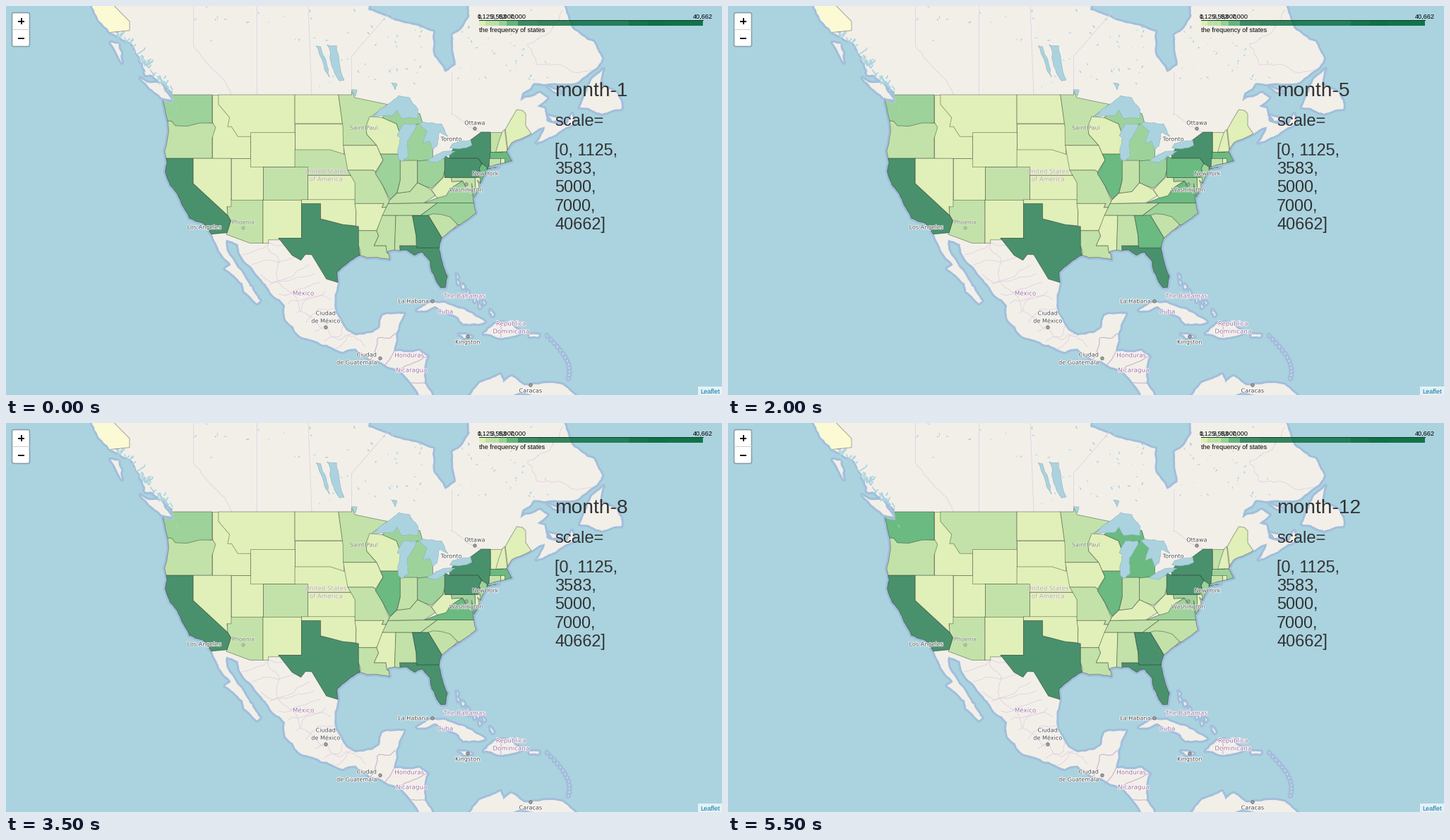
These frames come from a looping animation (1014 by 552 pixels, 6000 ms). A matplotlib script:

```python
import numpy as np
import matplotlib.pyplot as plt
from matplotlib.animation import FuncAnimation
from matplotlib.colors import to_rgb
from matplotlib.patches import Circle, Ellipse, FancyBboxPatch, Polygon, Rectangle
from matplotlib.patheffects import withStroke

W, H, DPI = 1014, 552, 100
PX = 72 / DPI
SEA, LAND, COAST, LILAC = "#aad3df", "#f2efe9", "#a2bedc", "#dfcfdf"
YLGN = ["#ffffcc", "#d9f0a3", "#addd8e", "#78c679", "#31a354", "#006837"]
FILLS = [0.7 * np.array(to_rgb(c)) + 0.3 * np.array(to_rgb(LAND)) for c in YLGN]
BORDER = (0, 0, 0, 0.36)
MONTHS, LOW_MONTH = 12, 6
DEGREE = 9.02

rng = np.random.default_rng(7)
fig = plt.figure(figsize=(W / DPI, H / DPI), dpi=DPI, facecolor=SEA)
ax = fig.add_axes([0, 0, 1, 1])
ax.set_xlim(0, W)
ax.set_ylim(H, 0)
ax.axis("off")


def project(*flat):
    """Web Mercator pixels from alternating degrees west and degrees north."""
    west, north = np.reshape(flat, (-1, 2)).T
    y = np.degrees(np.log(np.tan(np.pi / 4 + np.radians(north) / 2)))
    return np.column_stack([1347.6 - DEGREE * west, 634.4 - DEGREE * y])


def rough(*flat, amount=0.05, levels=3):
    """Join a few places by a ragged line, using midpoint displacement."""
    p = project(*flat)
    for _ in range(levels):
        step = np.diff(p, axis=0)
        normal = np.column_stack([-step[:, 1], step[:, 0]])
        out = np.empty((2 * len(p) - 1, 2))
        out[::2] = p
        out[1::2] = p[:-1] + step / 2 + normal * rng.normal(0, amount, (len(step), 1))
        p = out
    return p


def land(points):
    ax.add_patch(Polygon(points, fc=COAST, ec=COAST, lw=6 * PX, joinstyle="round", zorder=1))
    return ax.add_patch(Polygon(points, fc=LAND, lw=0, zorder=2))


def island(*flat):
    return land(rough(*flat, *flat[:2]))


def lake(*flat):
    ax.add_patch(Polygon(rough(*flat, *flat[:2]), fc=SEA, ec="#8db4bd", lw=0.6 * PX, zorder=6))


def line(*flat, color=LILAC, width=0.8, amount=0.05, clip=None):
    drawn, = ax.plot(*rough(*flat, amount=amount).T, color=color, lw=width * PX, zorder=3.5)
    if clip:
        drawn.set_clip_path(clip)


def text(x, y, s, size, color="black", ha="center", **kw):
    return ax.text(x, y, s, fontsize=size * PX, color=color, ha=ha,
                   **{"family": "Liberation Sans", "va": "baseline", "zorder": 9, **kw})


def place(x, y, s, dot=None, country=False, alpha=1):
    color, size = ("#9d6a9d", 8.7) if country else ("#454545", 8.1)
    halo = [withStroke(linewidth=1.2, foreground=(1, 1, 1, 0.45 * alpha))]
    for i, row in enumerate(s.split("\n")):
        text(x, y + 11 * i, row, size, color, va="center", zorder=7, alpha=alpha,
             family="DejaVu Sans", path_effects=halo)
    if dot:
        ax.add_patch(Circle(dot, 2.2, fc="#a5a29f", ec="#686563", lw=0.8 * PX, zorder=7, alpha=alpha))


# Coast of the mainland, followed anticlockwise from the northwest
northwest = rough(136.5, 58, 135, 56.3, 133, 55, 130.3, 54.2, 128.4, 52.4, 127.5, 51, 125, 50.2,
                  123.2, 49.3, 122.4, 47.3, 122.8, 48.1, 124.7, 48.4, amount=0.1)
pacific = rough(124.7, 48.4, 124.0, 46.2, 124.1, 44, 124.5, 42.8, 124.1, 41.5, 124.4, 40.4,
                123.7, 38.9, 122.5, 37.7, 121.9, 36.6, 120.6, 34.6, 118.5, 34, 117.1, 32.5, amount=0.03)
mexico = rough(117.1, 32.5, 116, 30.4, 114.1, 28.4, 115, 27.8, 112.3, 25.8, 112, 24.6, 110, 22.9,
               109.5, 23.3, 111.3, 25.8, 114.7, 30.3, 114.8, 31.8, 113, 31.2, 112.2, 29.2,
               109.5, 26.5, 108, 24.7, 105.6, 22.6, 105.5, 20.5, 103.5, 18.3, 100, 16.9,
               96.5, 15.7, 94.5, 16.2, 92.2, 14.5, 87.5, 12.9, 85.8, 11, 84.5, 9)
caribbean = rough(82.5, 9, 83.7, 11, 83.2, 15, 84.5, 15.9, 88.5, 15.8, 88.2, 18.4, 86.9, 21.4,
                  90.3, 21.1, 90.7, 19.4, 91.9, 18.6, 94.5, 18.2, 96, 19, 97.6, 21.5, 97.8, 24, 97.3, 25.9)
gulf = rough(97.3, 25.9, 97.4, 27.4, 95, 29.1, 93.8, 29.7, 91.5, 29.4, 89.2, 29.1, 89.5, 30.2,
             86.5, 30.4, 85.3, 29.7, 84, 30.1, 82.8, 28.8, 82.6, 27.5, 81.8, 26, 81.1, 25.2, amount=0.04)
atlantic = rough(81.1, 25.2, 80.4, 25.2, 80.1, 26.8, 81.4, 30.5, 81, 32, 79.2, 33.2, 77.9, 33.9,
                 76.5, 34.7, 75.6, 35.3, 76, 36.8, 76.3, 39, 75.9, 37.3, 75.1, 38.5, 75.4, 39.4,
                 74.9, 39, 74, 40.4, 73.7, 41, 71, 41.5, 70, 41.7, 70.8, 42.8, 70, 43.8, 67, 44.8,
                 amount=0.03)
northeast = rough(67, 44.8, 64.8, 45.6, 66.1, 43.8, 63.5, 44.6, 60.2, 45.9, 60.5, 47, 61.4, 45.8,
                  64.5, 46.2, 64.9, 47.6, 66, 47.8, 64.4, 48.7, 65.5, 49.2, 68.5, 48.4, 71.2, 46.8,
                  68.3, 49.2, 66.5, 50.2, 60, 50.2, 57.2, 51.5, 55.8, 52.6, 57.2, 54.2, 60.5, 55.4, 62, 57.6)
hudson = rough(77, 58, 76.6, 56.5, 79.3, 54.8, 78.8, 52, 80.5, 51.3, 82.3, 53, 82.3, 55.1,
               87.6, 56, 92.5, 57, 92.5, 58)
mainland = land(np.vstack([northwest, pacific, mexico, caribbean, gulf, atlantic, northeast, hudson]))
for shore in (pacific, gulf, atlantic):
    ax.plot(*shore.T, color=BORDER, lw=0.9 * PX, zorder=5.5)

island(128.3, 50.7, 125.2, 50.2, 123.4, 48.5, 125, 48.7, 127, 49.8)
island(133, 54.1, 131.7, 54, 131.2, 52.2)
island(55.6, 51.6, 56.2, 50, 53.5, 49.2, 52.8, 47.5, 55.8, 47, 59.3, 47.7, 57.5, 50.5)
island(64.4, 49.9, 62, 49.2, 63.5, 49.4)
island(64.2, 46.8, 62.2, 46.4, 63.6, 46.2)
island(84.9, 21.9, 82.8, 23, 80.5, 23, 77, 21.7, 74.2, 20.2, 77.6, 19.9, 78.3, 20.8, 82, 22.5)
island(74.4, 18.4, 72.7, 19.9, 70, 19.8, 68.4, 18.6, 71.5, 17.8)
island(78.3, 18.4, 76.2, 18, 77.5, 17.8)
island(67.2, 18.4, 65.7, 18.3, 65.8, 18, 67.2, 18)
island(77.5, 8, 75, 11, 71.8, 12.3, 71.3, 11, 70, 12, 68, 10.6, 62, 10.7, 60, 9, 60, 7)
long_island = island(74, 40.6, 72, 41, 73.6, 40.9)
for t in np.linspace(0, 1, 13):
    west, north = 64.5 - 3.5 * np.sin(1.9 * t), 18.3 - 6.5 * t
    island(west, north, west - 0.2, north - 0.2, west, north - 0.3)
    west, north = 78.6 - 5.6 * t + rng.normal(0, 0.4), 26.7 - 5.3 * t + rng.normal(0, 0.3)
    island(west, north, west - 0.3, north - 0.4, west - 0.1, north - 0.6)

# Waters
lake(92, 46.7, 89, 48.2, 87.8, 48.9, 86, 48.7, 84.7, 47.5, 84.7, 46.5, 87.3, 46.5, 88, 47.4,
     88.5, 46.9, 90.5, 46.8)
lake(87.8, 42, 87.2, 41.6, 86.3, 42.2, 86.4, 44, 85.5, 45, 85, 45.9, 87, 45.9, 88, 44.6, 87.5, 44.4, 87.9, 43)
lake(84.7, 45.9, 83.3, 45.1, 83.9, 43.7, 82.9, 44, 82.4, 43, 81.7, 43.5, 81.4, 45, 80, 44.5, 81, 45.9, 84, 46.1)
lake(83.4, 41.7, 81.7, 41.5, 78.9, 42.8, 81, 42.7, 82.5, 42.1)
lake(79.7, 43.2, 76.3, 43.5, 76.5, 44.1, 79.3, 43.7)
lake(99, 53.9, 97.5, 53.8, 96.3, 50.5, 97, 50.4, 98.3, 52)
lake(100.7, 53.8, 100, 53.7, 98.6, 50.8, 99.4, 51.6)
lake(88.9, 50.2, 88, 50.1, 88.3, 49.5)
lake(95.2, 49.5, 94.3, 49.5, 94.5, 48.9)
for west, east, south, north, count in [(102, 84, 49.5, 57.3, 45), (79, 63, 50.5, 57, 45), (120, 102, 54, 57.3, 12)]:
    for _ in range(count):
        spot = project(rng.uniform(east, west), rng.uniform(south, north))[0]
        ax.add_patch(Ellipse(spot, rng.uniform(1, 5), rng.uniform(0.6, 2),
                             angle=rng.uniform(0, 180), fc=SEA, zorder=3))
for t in rng.uniform(0, 1, 50):
    west, north = 135 - 11.5 * t + rng.normal(0, 0.3), 57 - 7.3 * t
    reach = rng.uniform(0.4, 1.3)
    line(west, north, west - reach * rng.uniform(0.2, 1), north - reach * rng.choice([-0.4, 0.8]),
         color=SEA, width=1.6, amount=0.12)

# Base map borders
for west, north, south, east in [(120, 58, 53.8, 120), (110, 58, 49, 110), (102, 58, 49, 101.4),
                                 (95.15, 52.8, 49, 95.15), (79.5, 51.3, 47, 79.5)]:
    line(west, north, east, south, amount=0)
line(120, 53.8, 118, 52.3, 114, 49)
line(95.15, 52.8, 89, 56.9, amount=0)
line(79.5, 47, 77, 45.7, 74.8, 45)
line(62, 57, 64, 55, 67.5, 54, 66, 52, 63.5, 52, 57.2, 51.5, amount=0.12)
for t in np.linspace(0.05, 1, 11):
    line(113 - 15 * t, 30.5 - 14.5 * t, 104 - 9 * t, 31.5 - 13 * t, amount=0.12, clip=mainland)
line(108.2, 31.3, 107, 27, 104, 24, 101, 20.5, 97, 17.5, 93, 16.5, amount=0.12)
for route in [(92.2, 14.5, 91.4, 16.1, 91, 17.8, 89.1, 17.8, 88.3, 18.5), (90, 13.6, 89.2, 14.5, 88.5, 15.8),
              (87.5, 12.9, 86, 13.8, 83.2, 15), (85.7, 11, 83.7, 10.9), (71.8, 19.8, 71.7, 18)]:
    line(*route, color="#c9a9cb", width=1)

states = []


def state(level, *outline, low=None, up=(), down=(), clip=mainland):
    """Add a state over its neighbours, cut off at the coast.

    Four numbers give a box: west, north, east, south. The colour class is
    raised or lowered in some months; low is the drop in the low month.
    """
    if len(outline) == 4:
        w, n, e, s = outline
        outline = w, n, e, n, e, s, w, s
    patch = Polygon(project(*outline), ec=BORDER, lw=0.9 * PX, joinstyle="round", zorder=5)
    ax.add_patch(patch)
    patch.set_clip_path(clip)
    if low is None:
        low = int(level > 1)
    states.append((patch, [level + up.count(m) - down.count(m) - low * (m == LOW_MONTH)
                           for m in range(1, MONTHS + 1)]))


# West; each state needs only the borders that later neighbours leave open
state(0, 140, 60, 135.5, 59, 130, 56, 130, 55.2, 137, 54.8)
state(1, 117.03, 49, 111.05, 42)
state(2, 125, 46.3, 116.9, 46, 116.5, 45.5, 117.03, 44.3, 117.03, 42, 125, 42)
state(3, 125, 49, 117.03, 49, 117.03, 46, 119, 46, 121, 45.65, 122.8, 45.7, 123.4, 46.2, 125, 46.3, up=(12,))
state(1, 116.05, 49, 104.05, 49, 104.05, 44.5, 113, 44.5, 114, 45.6, 114.6, 45.6, 114.3, 46.6,
      116.05, 48, low=1, up=(12,))
state(2, 114.6, 37, 109.05, 37, 109.05, 31.33, 111.07, 31.33, 114.8, 32.5, 114.1, 34.3, 114.7, 35.1)
state(5, 125, 42, 120, 42, 120, 39, 114.6, 35, 114.1, 34.3, 114.7, 32.72, 117.1, 32.53, 122, 33, low=0)
state(1, 120, 42, 114.05, 42, 114.05, 36.1, 114.7, 36.1, 114.6, 35, 120, 39, low=1)
state(1, 114.05, 42, 109.05, 37, low=1, up=(3,))
state(1, 111.05, 45, 104.05, 41, low=1)
state(1, 109.05, 37, 103, 37, 103, 32, 106.6, 32, 106.5, 31.78, 108.2, 31.78, 108.2, 31.33, 109.05, 31.33)
# Plains
state(1, 104.05, 49, 97.2, 49, 96.56, 45.94, 104.05, 45.94, low=1)
state(1, 104.05, 45.94, 96.45, 42.5, low=1)
state(1, 104.05, 43, 98.5, 43, 96.4, 42.5, 95.2, 42.5, 95.2, 40, 104.05, 40, up=(1,))
state(2, 109.05, 41, 102.05, 37)
state(1, 102.05, 40, 94.62, 37, low=1)
state(5, 103, 36.5, 100, 36.5, 100, 34.5, 94.04, 33.5, 94.04, 31, 93.7, 29, 96, 27, 97.1, 25.85,
      99.1, 26.4, 101.4, 29.77, 102.4, 29.8, 103.1, 29, 104.5, 29.7, 106.6, 32, 103, 32)
state(1, 103, 37, 94.62, 37, 94.43, 35.4, 94.48, 33.64, 96.5, 33.8, 100, 34.56, 100, 36.5, 103, 36.5)
state(2, 97.2, 49, 95.15, 49, 95.1, 49.4, 94.6, 48.7, 91, 48.2, 89.5, 48, 92, 46.7, 92.9, 45.6,
      92.75, 44.75, 91.2, 43.5, 96.45, 43.5, 96.5, 45.5)
state(1, 96.45, 43.5, 91.2, 43.5, 90.2, 41.8, 91.4, 40.4, 91.75, 40.6, 95.75, 40.6)
state(2, 95.75, 40.6, 91.75, 40.6, 91.4, 40.4, 90.2, 38.7, 89.2, 36.8, 89.7, 36, 90.4, 36,
      90.1, 36.5, 94.62, 36.5, 94.62, 39.1)
state(1, 94.62, 36.5, 90.1, 36.5, 90.4, 36, 89.7, 36, 91.2, 33, 94.04, 33, 94.04, 33.55, 94.48, 33.64, 94.43, 35.4)
# South
state(2, 94.04, 33, 91.2, 33, 90.9, 32.3, 91.6, 31, 89.75, 31, 89.6, 30.2, 88, 28.8, 94, 29, 93.7, 30.1, 94.04, 31,
      low=2)
state(1, 90.3, 35, 88.2, 35, 88.4, 30, 89.6, 30, 89.75, 31, 91.6, 31, 90.9, 32.3, 91.2, 33, low=1, up=(1,))
state(5, 87.6, 31, 79.5, 24.5)
state(2, 88.2, 35, 85.6, 35, 85, 32.3, 85, 31, 87.6, 31, 87.5, 30, 88.4, 30, down=(10,))
state(3, 84.3, 35, 81.7, 36.58, 75, 36.58, 75, 34, 79, 33.7, low=2, down=(3, 8, 12))
state(2, 83.1, 35, 82.3, 35.2, 81, 35.1, 79.7, 34.8, 78.5, 33.8, 80.8, 31.8, 82, 33.5)
state(5, 85.6, 35, 83.1, 35, 82, 33.5, 80.8, 31.8, 81.2, 30.7, 84.9, 30.7, 85, 32.3, low=2, down=(5,))
state(2, 90.3, 35, 84.3, 35, 81.7, 36.58, 89.4, 36.5)
state(2, 89.4, 36.5, 83.7, 36.6, 82, 37.5, 82.6, 38.2, 83.7, 38.7, 84.8, 39.1, 86, 38, 88, 37.8, 89.1, 37,
      down=(5, 12))
state(4, 83.7, 36.58, 75.8, 36.58, 75.5, 38, 77, 38.3, 77.7, 39.3, 79.6, 38.5, 81.7, 37.2,
      low=2, down=(1, 2, 10, 10, 12))
state(3, 79.5, 39.72, 75.78, 39.72, 75.7, 38.46, 75, 38.4, 75.5, 38, 77, 38.3, 77.7, 39.3, 79.4, 39.2,
      up=(3,), down=(1, 10))
state(1, 82.6, 38.2, 80.7, 39.8, 80.6, 40.6, 80.5, 39.72, 79.5, 39.7, 79.4, 39.2, 77.8, 39.3,
      79.6, 38.4, 80.3, 37.5, 81.7, 37.2)
# Midwest
state(3, 87, 45.9, 82.4, 41.72, up=(12,))
state(3, 90.4, 46.55, 88, 48, 84.4, 47, 84, 46, 87, 45.5, 87.7, 45.1, 88.1, 45.9, up=(12,))
state(1, 92.3, 46.7, 90.4, 46.6, 88.1, 45.9, 87.7, 45.1, 86.8, 45.4, 87.8, 42.5, 90.6, 42.5,
      91.2, 43.5, 92.75, 44.75, 92.9, 45.6)
state(4, 90.6, 42.5, 87.5, 42.5, 87.5, 39.4, 88, 37.9, 89.1, 37, 90.2, 38.7, 91.4, 40.2, 90.2, 41.8,
      down=(1, 2, 3))
state(2, 87.5, 41.76, 84.8, 41.76, 84.8, 39.1, 86, 38, 88, 37.8, 87.5, 39.4)
state(3, 84.8, 41.7, 80.52, 42, 80.52, 40.6, 80.8, 39.7, 82.6, 38.4, 83.7, 38.7, 84.8, 39.1, down=(3, 10, 12))
# Northeast
state(5, 79.76, 42.5, 79, 43.3, 76.2, 43.6, 76.5, 44.1, 74.8, 45, 73.35, 45, 73.3, 42.7, 73.6, 41,
      74, 40.6, 74.7, 41.4, 75.3, 42, 79.76, 42, low=0)
state(5, 74.1, 41.2, 71.8, 40.4, low=0, clip=long_island)
state(5, 80.52, 42.3, 79.76, 42, 75.3, 42, 74.7, 41.4, 75.1, 40.8, 74.8, 40.1, 75.5, 39.72, 80.52, 39.72,
      low=2, down=(5, 10))
state(1, 73.35, 45, 71.5, 42.73, up=(1, 12))
state(1, 71.5, 45, 71.1, 45.3, 70.7, 42.8, 72.5, 42.73, 72, 44)
state(1, 71, 45.3, 70.2, 46.3, 69.2, 47.45, 68.3, 47.35, 67.8, 47, 67.8, 45.7, 66.9, 44.8, 67, 43.5, 70.6, 43)
state(4, 73.5, 42.73, 69.5, 41.3, down=(3, 12))
state(2, 73.6, 42.05, 71.8, 40.9)
state(1, 71.8, 42, 71.1, 41.2)
state(3, 74.7, 41.4, 73.9, 41, 73.8, 40, 74.9, 38.8, 75.5, 39.6, 74.8, 40.1, 75.1, 40.8, up=(1,))
state(1, 75.8, 39.75, 75, 38.45)

# Labels; those under a coloured state are faint
place(453, 235, "United States\nof America", country=True, alpha=0.4)
place(421, 408, "México", country=True)
place(571, 496, "Honduras", country=True)
place(574, 517, "Nicaragua", country=True)
place(649, 412, "The Bahamas", country=True)
place(622, 434, "Cuba", country=True)
place(715, 451, "República\nDominicana", country=True)
place(507, 173, "Saint Paul", alpha=0.4)
place(336, 307, "Phoenix", (336, 315), alpha=0.4)
place(281, 314, "Los Angeles", alpha=0.85)
place(679, 238, "New York", alpha=0.8)
place(652, 261, "Washington", (652, 253), alpha=0.75)
place(631, 189, "Toronto")
place(664, 166, "Ottawa", (664, 174))
place(453, 436, "Ciudad\nde México", (453, 456))
place(511, 495, "Ciudad", (530, 500))
place(497, 506, "de Guatemala")
place(577, 419, "La Habana", (604, 419))
place(654, 477, "Kingston", (654, 469))
place(743, 546, "Caracas", (743, 538))

# Colour scale
left, right, top = 670, 987, 20
breaks = [0, 1125, 3583, 5000, 7000, 40662]
ticks = [left + (right - left) * b / breaks[-1] for b in breaks]
for a, b, color in zip(ticks, ticks[1:], YLGN[1:]):
    ax.add_patch(Rectangle((a, top), b - a, 8, fc=color, alpha=0.75, lw=0, zorder=7))
for start, alpha in [(753, 0.15), (882, 0.4), (908, 0.3)]:
    ax.add_patch(Rectangle((start, top), min(right, start + 182) - start, 8, fc=YLGN[5],
                           alpha=alpha, lw=0, zorder=7))
ax.plot([left, right], [top, top], color="#123d28", lw=1 * PX, zorder=8)
for x, value in zip(ticks, breaks):
    text(x, 17.5, f"{value:,}", 9.1)
text(left, 37, "the frequency of states", 9.1, ha="left")

# Side panel
title = text(777, 128, "", 28.3, "#333333", ha="left")
text(777, 170, "scale=", 23.7, "#333333", ha="left")
for i, row in enumerate(["[0, 1125,", "3583,", "5000,", "7000,", "40662]"]):
    text(777, 212 + 26.2 * i, row, 23.5, "#333333", ha="left")

# Map controls
ax.add_patch(FancyBboxPatch((11, 12), 20, 43, boxstyle="round,pad=2.4", fc="white",
                            ec=(0.25, 0.35, 0.4, 0.5), lw=1.6 * PX, zorder=8))
ax.plot([9.5, 32.5], [33, 33], color="#cccccc", lw=1 * PX, zorder=9)
for y, arms in [(21.5, [(4.5, 0), (0, 4.5)]), (45.5, [(4.5, 0)])]:
    for dx, dy in arms:
        ax.plot([21.5 - dx, 21.5 + dx], [y - dy, y + dy], color="black", lw=1.8 * PX,
                solid_capstyle="butt", zorder=9)
ax.add_patch(Rectangle((980, 540), 34, 12, fc="white", alpha=0.7, lw=0, zorder=8))
text(997.5, 549.5, "Leaflet", 9.1, "#0078a8")


def update(month):
    for patch, levels in states:
        patch.set_facecolor(FILLS[levels[month]])
    title.set_text(f"month-{month + 1}")
    return [title]


anim = FuncAnimation(fig, update, frames=MONTHS, interval=500, repeat=True, repeat_delay=0)
plt.show()
```
